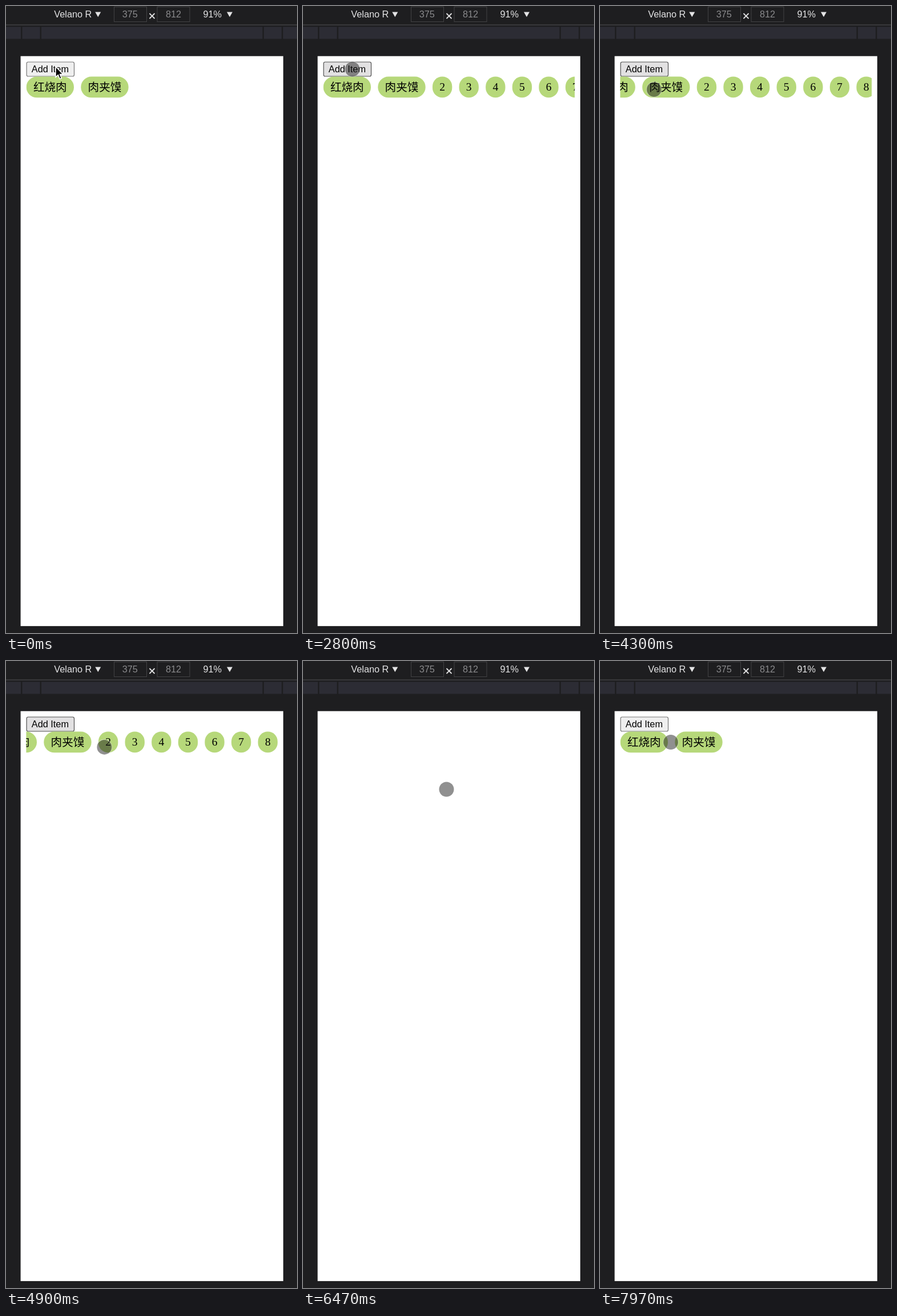
Animation, 510 px wide and 1097 px high, one loop 8 s. Source, as an HTML page:

```html
<!DOCTYPE html>
<html lang="en">
<head>
<meta charset="utf-8">
<title>Add items to a scrolling list</title>
<style>
  html, body { margin: 0; width: 100%; height: 100%; overflow: hidden; background: #1e1e20; }
  svg { display: block; width: 100vw; height: 100vh; }
  .ui { font: 16.3px "Liberation Sans", Arial, sans-serif; }
  .pill { font: 19.63px "Liberation Serif", "Noto Sans CJK SC", "Noto Sans CJK", serif; text-anchor: middle; }
</style>
</head>
<body>
<svg viewBox="0 0 510 1097" preserveAspectRatio="none">
  <defs>
    <clipPath id="listClip"><rect x="35.4" y="120" width="440.8" height="44"/></clipPath>
  </defs>
  <rect width="510" height="1097" fill="#1e1e20"/>

  <g class="ui" fill="#e4e4e5">
    <text x="84.3" y="20.4">Velano R</text>
    <path d="M156.3 10.5H166.3L161.3 19.2Z"/>
    <g fill="none" stroke="#424244">
      <rect x="189.5" y="1.5" width="57" height="26"/>
      <rect x="265" y="1.5" width="57" height="26"/>
    </g>
    <g fill="#8a8a8c" text-anchor="middle">
      <text x="217.3" y="20.4">375</text>
      <text x="293.6" y="20.4">812</text>
    </g>
    <path d="M251.5 13L260.5 22M260.5 13L251.5 22" stroke="#e4e4e5" stroke-width="1.8"/>
    <text x="345.4" y="20.4">91%</text>
    <path d="M387 10.5H397L392 19.2Z"/>
  </g>
  <rect y="32.5" width="510" height="1.2" fill="#4b4b4d"/>
  <path d="M0 36.5H26V57.5H0ZM28.5 36.5H59.5V57.5H28.5ZM62 36.5H449.5V57.5H62ZM452 36.5H483V57.5H452ZM485.5 36.5H510V57.5H485.5Z" fill="#2c2c34"/>

  <rect x="25.6" y="87.7" width="460.3" height="997.2" fill="#fff"/>
  <g id="content">
    <rect id="button" x="36.1" y="98" width="83.4" height="25" rx="2.8" stroke-width="1.2"/>
    <text class="ui" x="44.8" y="116.2">Add Item</text>
    <g clip-path="url(#listClip)"><g id="list"></g></g>
  </g>
  <circle id="touch" r="13" fill="#141414" fill-opacity=".47" stroke="#fff" stroke-opacity=".4" stroke-width="1.6" paint-order="stroke"/>
  <path id="arrow" d="M0 0V18.5L4.3 14.6L7.2 21.6L10.3 20.3L7.4 13.4H13Z" fill="#000" stroke="#fff" stroke-width="1.5"/>
</svg>
<script>
const LOOP = 8000;
const SCALE = 460 / 375;
const SVG_NS = "http://www.w3.org/2000/svg";
const $ = id => document.getElementById(id);
const content = $("content"), button = $("button"), list = $("list"), touch = $("touch"), arrow = $("arrow");

const BUTTON_LOOKS = {
  idle: ["#efefef", "#767676"],
  hover: ["#e2e1e2", "#4f4f4f"],
  active: ["#f5f5f5", "#8d8d8d"]
};
// Each click: [item added, button released]
const CLICKS = [[500, 700], [970, 1100], [1370, 1500], [1800, 2000], [2230, 2400], [2670, 2800], [3000, 3270]];
const RELOAD_START = 6470, RELOAD_END = 6770;

const ARROW_PATH = [[30, 87, 106], [130, 85.5, 107.5]];
const TOUCH_PATH = [
  [3630, 86.5, 110.5], [3900, 160, 138], [4100, 152, 142], [4300, 95, 146], [4480, 44, 149],
  [4600, 44, 150], [5050, 236, 151], [5300, 285, 150], [5470, 313, 150],
  [5900, 313, 150], [6170, 251.5, 224.5], [6770, 251.5, 224.5], [7300, 146, 123],
  [7670, 146, 123], [7800, 114, 141], [7970, 124, 142]
];
const SCROLL_PATH = [[4090, 0], [4300, 57], [4340, 65], [5050, 65], [5300, 16.7], [5470, 0]];

function sample(path, t) {
  const next = path.findIndex(key => key[0] > t);
  if (next === 0) return path[0].slice(1);
  if (next < 0) return path[path.length - 1].slice(1);
  const from = path[next - 1], to = path[next];
  const k = (t - from[0]) / (to[0] - from[0]);
  return from.slice(1).map((v, i) => v + (to[i + 1] - v) * k);
}

function addNode(parent, tag, attrs, text = "") {
  const node = document.createElementNS(SVG_NS, tag);
  for (const name in attrs) node.setAttribute(name, attrs[name]);
  node.textContent = text;
  parent.append(node);
  return node;
}

let nextX = 35.6;
const pills = ["红烧肉", "肉夹馍", 2, 3, 4, 5, 6, 7, 8].map(label => {
  const isWord = typeof label === "string";
  const width = (20 + (isWord ? 48 : 8)) * SCALE;
  const group = addNode(list, "g", {});
  const radius = Math.min(15 * SCALE, width / 2);
  addNode(group, "rect", { x: nextX, y: 123.5, width, height: 30 * SCALE, rx: radius, ry: radius, fill: "#b6d87a" });
  addNode(group, "text", { class: "pill", x: nextX + width / 2, y: isWord ? 149.2 : 148.3 }, label);
  nextX += width + 10 * SCALE;
  return group;
});

const show = (node, visible) => node.setAttribute("visibility", visible ? "visible" : "hidden");
const place = (node, [x, y = 0]) => node.setAttribute("transform", `translate(${x} ${y})`);

function buttonState(t) {
  if (t < CLICKS[0][0] || t >= 5900) return "idle";
  return CLICKS.some(([down, up]) => t >= down && t < up) ? "active" : "hover";
}

function render(t) {
  const reloaded = t >= RELOAD_END;
  const added = reloaded ? 0 : CLICKS.filter(([down]) => t >= down).length;
  content.style.display = t >= RELOAD_START && !reloaded ? "none" : "";
  pills.forEach((pill, i) => show(pill, i < 2 + added));

  const [fill, stroke] = BUTTON_LOOKS[buttonState(t)];
  button.setAttribute("fill", fill);
  button.setAttribute("stroke", stroke);

  place(list, [-sample(SCROLL_PATH, t)[0]]);
  place(arrow, sample(ARROW_PATH, t));
  place(touch, sample(TOUCH_PATH, t));
  show(arrow, t < 270);
  show(touch, t >= 270);
}

const start = performance.now();
function tick() {
  render((performance.now() - start) % LOOP);
  requestAnimationFrame(tick);
}
tick();
</script>
</body>
</html>
```
